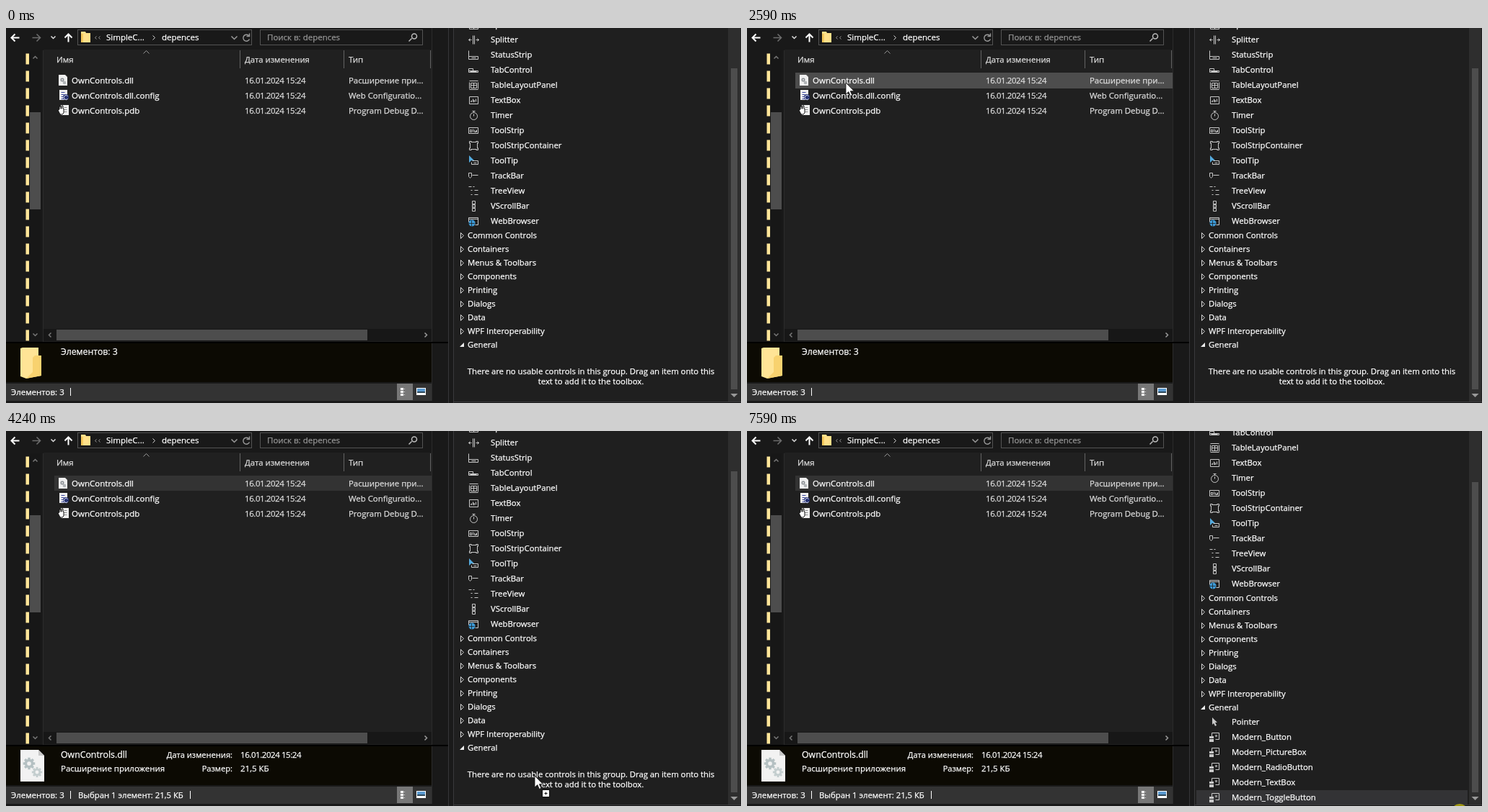
Animation, 1019 px wide and 521 px high, one loop 7660 ms. Source, as an HTML page with a canvas:

```html
<!DOCTYPE html>
<html lang="ru">
<head>
<meta charset="utf-8">
<title>Toolbox drag and drop</title>
<style>
html, body { margin: 0; width: 100%; height: 100%; overflow: hidden; background: #191919; }
canvas { display: block; }
</style>
</head>
<body>
<canvas id="stage" width="1019" height="521"></canvas>
<script>
const g = document.getElementById('stage').getContext('2d');
const LOOP = 7660, STEP = 70;
const PRESS = 2660, DETAILS = 2730, BLUR = 3420, DROP = 4240, ADDED = 4640, SCROLL = 5560, LEAVE = 6800, CLICK = 7590;

// The pointer advances in steps of 70 ms, counted from these moments.
const starts = [0, 390, 1500, 1700, 2590, 3350, DROP, ADDED, 5230, 5300, SCROLL, 5690, 6240, CLICK];
const track = [
  [390, 804, 512], [600, 650, 425], [810, 380, 270], [950, 220, 172], [1090, 142, 133], [1160, 142, 123],
  [1300, 140, 106], [1499, 140, 106], [1500, 139, 104], [1699, 139, 104], [1700, 139, 107], [1840, 140, 114],
  [2050, 139, 100], [2260, 138, 85], [2460, 137, 77], [2590, 137, 76], [2800, 142, 80], [2940, 230, 136],
  [3150, 530, 315], [3350, 714, 419], [3630, 728, 465], [3840, 733, 479], [5229, 733, 479], [5230, 735, 479],
  [5300, 736, 478], [5689, 736, 478], [6239, 736, 478], [6240, 741, 478], [6450, 790, 491], [6660, 920, 511],
  [LEAVE, 988, 540]
];

const tools = [
  ['SplitContainer', 'M-6-6H6V6H-6ZM0-6V6'],
  ['Splitter', 'M-1-6V6M1-6V6M-7 0H-3M3 0H7M-5-2L-7 0L-5 2M5-2L7 0L5 2'],
  ['StatusStrip', 'M-7-6V6H6V2H-7M-3 4H3'],
  ['TabControl', 'M-7-2H-1V1H6V3H-7ZM-7 1H0M-5 2H4'],
  ['TableLayoutPanel', 'M-6-6H6M-6 6H6M-6-4V5M6-4V5M-4-3H4V4H-4ZM-4 0H4M0-3V4'],
  ['TextBox', 'M-6-5H6V5H-6ZM-3 0V2H-4V1M-1-2V2H1V0H-1M3-2V2'],
  ['Timer', 'M5 1A5 5 0 1 1-5 1A5 5 0 1 1 5 1M0 1V-2M-2-6H2M0-6V-4'],
  ['ToolStrip', 'M-7-4H6V4H-7ZM-5-1V2H-3V-1ZM-1-2V2M1-1V2H4V-1M3 0V2'],
  ['ToolStripContainer', 'M-6-3V-6H-3M3-6H6V-3M6 3V6H3M-3 6H-6V3M-5-4V4M5-4V4M-4-5H4M-4 5H4'],
  ['ToolTip', 'M-2 0H6V5H-3V2M0 3H4'],
  ['TrackBar', 'M-7-4H-3V1L-5 3L-7 1ZM-2-1H6'],
  ['TreeView', 'M-7-6H-3M-1-6H1M-4-1H-2M1-1H6M-4 5H-2M1 5H6'],
  ['VScrollBar', 'M-2-7H2V-3H-2ZM-2-2H2V2H-2ZM-2 3H2V7H-2ZM0-5V-5M0 5V5M-1 0H1'],
  ['WebBrowser', 'M-7 1V-5H6V5H2M-7-3H6']
].map(([name, d]) => [name, new Path2D(d)]);
const groups = ['Common Controls', 'Containers', 'Menus & Toolbars', 'Components', 'Printing', 'Dialogs', 'Data',
  'WPF Interoperability', 'General'];
const added = ['Pointer', 'Modern_Button', 'Modern_PictureBox', 'Modern_RadioButton', 'Modern_TextBox', 'Modern_ToggleButton'];
const files = [
  ['OwnControls.dll', 'Расширение при...'],
  ['OwnControls.dll.config', 'Web Configuratio...'],
  ['OwnControls.pdb', 'Program Debug D...']
];
const DATE = '16.01.2024 15:24';
const ARROW = new Path2D('M0 0V16L3.8 12.6L6.4 18.4L8.8 17.4L6.3 11.7H11.4Z');

function rect(x, y, w, h, color) {
  g.fillStyle = color;
  g.fillRect(x, y, w, h);
}
function frame(x, y, w, h, color) {
  g.strokeStyle = color;
  g.lineWidth = 1;
  g.strokeRect(x + .5, y + .5, w - 1, h - 1);
}
// A hairline stroke gives the small glyphs full brightness.
function text(s, x, y, color = '#fff', align = 'left', size = 11.5, gap = 0) {
  g.font = size + 'px "Open Sans", "Noto Sans", sans-serif';
  g.letterSpacing = gap + 'px';
  g.textAlign = align;
  g.fillStyle = g.strokeStyle = color;
  g.lineWidth = .25;
  g.fillText(s, x, y + 4);
  g.strokeText(s, x, y + 4);
}
const date = (x, y, color) => text(DATE, x, y, color, 'left', 11.4, -.38);
const label = (s, x, y, align) => text(s, x, y, '#fff', align, 11.3);
const heading = (s, x, y) => text(s, x, y, '#fff', 'left', 12.3);

function path(d, x, y, { fill, stroke, width = 1 }) {
  const p = typeof d === 'string' ? new Path2D(d) : d;
  g.save();
  g.translate(x, y);
  if (fill) { g.fillStyle = fill; g.fill(p); }
  if (stroke) { g.strokeStyle = stroke; g.lineWidth = width; g.stroke(p); }
  g.restore();
}
const line = (d, x, y, stroke, width) => path(d, x + .5, y + .5, { stroke, width });
function disc(x, y, r, color) {
  g.fillStyle = color;
  g.beginPath();
  g.arc(x, y, r, 0, 7);
  g.fill();
}
function gear(x, y, r, color) {
  g.strokeStyle = color;
  g.lineWidth = r * .45;
  g.beginPath();
  g.arc(x, y, r * .6, 0, 7);
  g.stroke();
  for (let i = 0; i < 8; i++) {
    const a = i * Math.PI / 4, c = Math.cos(a), s = Math.sin(a);
    g.beginPath();
    g.moveTo(x + c * r * .7, y + s * r * .7);
    g.lineTo(x + c * r * 1.1, y + s * r * 1.1);
    g.stroke();
  }
}

function pointerAt(t) {
  const base = starts.filter(s => s <= t).pop();
  const q = base + Math.floor((t - base) / STEP) * STEP;
  const i = track.findIndex(k => k[0] >= q);
  if (i < 0) return track[track.length - 1].slice(1);
  if (i === 0) return track[0].slice(1);
  const [t0, x0, y0] = track[i - 1], [t1, x1, y1] = track[i], f = (q - t0) / (t1 - t0);
  return [Math.round(x0 + (x1 - x0) * f), Math.round(y0 + (y1 - y0) * f)];
}

function addressBar() {
  line('M-5 0H6M0-5L-5 0L0 5', 12, 13, '#fff', 2);
  line('M-6 0H5M0-5L5 0L0 5', 42, 13, '#6d6d6d', 1.6);
  line('M-3-1L0 2L3-1', 65, 12, '#ddd', 1.5);
  line('M0 6V-5M-5 0L0-5L5 0', 86, 13, '#fff', 2);
  frame(99, 2, 242, 22, '#535353');
  path('M0 0H6L7 2H13V15H0Z', 104, 5, { fill: '#ffe08a' });
  rect(104, 8, 3, 12, '#f5c95c');
  line('M-1-2L-3 0L-1 2M4-2L2 0L4 2', 126, 13, '#999');
  text('SimpleC...', 139, 13);
  line('M-1-3L2 0L-1 3', 204, 13, '#ddd');
  text('depences', 216, 13);
  line('M-4-2L0 2L4-2', 316, 13, '#999', 1.5);
  line('M3-3A4.5 4.5 0 1 0 4 2M4-6V-2H0', 333, 13, '#999', 1.4);
  frame(352, 2, 226, 22, '#535353');
  text('Поиск в: depences', 362, 13, '#969696');
  line('M-1 1L-5 5M6-2A3.5 3.5 0 1 1-1-2A3.5 3.5 0 1 1 6-2', 563, 13, '#bbb', 1.5);
}

function navPane() {
  rect(33, 31, 15, 405, '#171717');
  rect(33, 117, 15, 135, '#4d4d4d');
  for (let i = 0; i < 17; i++) rect(27.5, 35.5 + i * 24, 4.5, 15, '#ffe699');
  line('M-3 2L0-1L3 2', 40, 40, '#777', 1.5);
  line('M-3-2L0 1L3-2', 40, 426, '#777', 1.5);
  rect(51, 31, 1, 405, '#2b2b2b');
}

function fileIcon(i, y) {
  if (i === 0) {
    path('M0 0H9L12 3V15H0Z', 73, y - 8, { fill: '#f0f0f0' });
    gear(78, y - 1, 2.6, '#8a8f94');
    gear(81, y + 3, 2, '#8a8f94');
  } else if (i === 1) {
    rect(74, y - 8, 11, 14, '#f0f0f0');
    line('M0 0H5M0 3H4M0 6H4M0 9H5', 76, y - 5, '#3a46a0');
    disc(83, y + 2, 4, '#263272');
    line('M2-2A3 3 0 1 0 2 2', 83, y + 2, '#e8ecff');
  } else {
    rect(76, y - 8, 11, 14, '#f0f0f0');
    line('M0 0H4M0 3H4M0 6H4', 80, y - 5, '#888');
    path('M0 5L2 4V0H4V3H5V-1H7V3H8V9L6 11H3Z', 72, y - 6, { fill: '#fff', stroke: '#111' });
  }
}

function fileList(t, y) {
  rect(52, 30, 538, 406, '#202020');
  text('Имя', 70, 44, '#dedede');
  text('Дата изменения', 331, 44, '#dedede', 'left', 11.3);
  text('Тип', 475, 44, '#dedede');
  for (const x of [324, 468, 588]) rect(x, 31, 1, 25, '#636363');
  line('M-4 2L0-2L4 2', 194, 33, '#999');

  const hover = t >= 390 && t < PRESS ? Math.floor((y - 62) / 21) : -1;
  files.forEach(([name, type], i) => {
    const cy = 73 + i * 21;
    if (i === 0 && t >= PRESS) {
      rect(67, 62, 523, 21, t < BLUR ? '#777' : '#333');
      if (t < BLUR) frame(67, 62, 524, 21, '#8c8c8c');
    } else if (i === hover) rect(67, cy - 11, 523, 22, '#4d4d4d');
    fileIcon(i, cy);
    text(name, 91, cy);
    date(331, cy, '#dedede');
    text(type, 475, cy, '#dedede', 'left', 11.4);
  });

  rect(52, 418, 538, 17, '#171717');
  rect(70, 419, 431, 15, '#4d4d4d');
  line('M2-3L-1 0L2 3', 60, 426, '#777', 1.5);
  line('M-2-3L1 0L-2 3', 582, 426, '#999', 1.5);
}

function details(t) {
  rect(0, 436, 590, 2, '#000');
  rect(0, 438, 590, 54, '#0c0a03');
  rect(0, 494, 590, 24, '#333');
  text('Элементов: 3', 7, 506);
  rect(89, 500, 1, 11, '#fff');
  if (t < DETAILS) {
    path('M0 1L3 0H25V11L29 12V39L8 43L0 40Z', 20, 444, { fill: '#ffe496' });
    path('M17 14L20 11H29V39L8 43L17 34Z', 20, 444, { fill: '#f8d26f' });
    heading('Элементов: 3', 76, 450);
  } else {
    path('M0 0H25L33 8V44H0Z', 20, 443, { fill: '#f2f2f2' });
    path('M25 0V8H33Z', 20, 443, { fill: '#c8c8c8' });
    gear(32, 462, 7.5, '#b4c0c2');
    gear(43, 474, 6.5, '#c4cecf');
    heading('OwnControls.dll', 76, 450);
    text('Расширение приложения', 76, 469);
    text('Дата изменения:', 314, 450, '#fff', 'right', 11.1);
    date(325, 450, '#fff');
    text('Размер:', 314, 469, '#fff', 'right', 11.1);
    text('21,5 КБ', 325, 469);
    text('Выбран 1 элемент: 21,5 КБ', 100, 506, '#fff', 'left', 11.3);
    rect(255, 500, 1, 11, '#fff');
  }
  rect(542, 494, 22, 23, '#777');
  for (let i = 0; i < 3; i++) {
    rect(547, 500 + i * 4, 4, 3, '#fff');
    rect(552, 501 + i * 4, 1, 1, '#ddd');
  }
  rect(569, 500, 13, 10, '#fff');
  rect(570, 501, 11, 6, '#5a9ad0');
  rect(570, 505, 11, 2, '#2f4a5c');
}

function toolbox(t, x, y) {
  rect(590, 0, 23, 521, '#191919');
  rect(590, 0, 1, 518, '#2b2b2b');
  rect(590, 436, 23, 2, '#000');
  rect(613, 0, 8, 521, '#1a1a1a');
  rect(613, 0, 1, 521, '#363638');
  rect(620, 0, 399, 520, '#1f1f1f');
  rect(620, 0, 1, 521, '#3a3a3c');
  rect(620, 519, 399, 1, '#3a3a3c');

  g.save();
  g.beginPath();
  g.rect(621, 0, 380, 519);
  g.clip();
  const filled = t >= ADDED;
  g.translate(0, t >= SCROLL ? -56 : 0);
  tools.forEach(([name, icon], i) => {
    const cy = i * 21 - 5;
    line(icon, 648, cy, '#c8c8c8');
    if (name === 'ToolTip') path('M-6-7V3L-3 0H1Z', 648, cy, { fill: '#55aadd' });
    if (name === 'WebBrowser') {
      disc(646, cy + 3, 4.5, '#3d9bd8');
      line('M-4 0H4M0-4V4', 645, cy + 3, '#1f1f1f', .8);
    }
    label(name, 672, cy);
  });
  groups.forEach((name, i) => {
    const cy = 288 + i * 19;
    if (name === 'General') path('M6-3V3H0Z', 629, cy, { fill: '#f0f0f0' });
    else line('M0-4V4L4 0Z', 630, cy, '#d8d8d8');
    label(name, 640, cy);
  });
  if (filled) {
    const inside = t < LEAVE && x < 999 && y < 519;
    const hover = inside ? Math.round((y + (t < 5690 ? 0 : 56) - 460) / 21) : -1;
    added.forEach((name, i) => {
      const cy = 460 + i * 21;
      if (i === hover) rect(623, cy - 10, 376, 20, '#3e3e40');
      else if (i === 5) rect(623, cy - 10, 376, 20, '#333335');
      if (i === 0) path('M-3-6V4L-1 2L1 6L3 5L1 1H4Z', 648, cy, { fill: '#c8c8c8' });
      else {
        line('M-4-1V-6H6V3H1', 648, cy, '#c8c8c8');
        rect(641, cy - 1, 6, 3, '#c8c8c8');
        rect(641, cy + 3, 6, 4, '#c8c8c8');
        rect(649, cy - 3, 3, 3, '#888');
      }
      label(name, 672, cy);
    });
  } else {
    label('There are no usable controls in this group. Drag an item onto this', 811, 477, 'center');
    label('text to add it to the toolbox.', 811, 491, 'center');
  }
  g.restore();

  rect(1001, 0, 17, 519, '#2e2e2e');
  const [top, height] = !filled ? [56, 446] : t < SCROLL ? [44, 431] : [71, 431];
  rect(1005, top, 9, height, '#4d4d4d');
  path('M-5-2H5L0 3Z', 1009.5, 510, { fill: '#999' });
}

function pointer(t, x, y) {
  const halo = 'rgba(225, 210, 0, .65)';
  if (t >= PRESS && t < DROP) disc(x - 1, y + 1, 12, halo);
  if (t >= CLICK) disc(988, 530, 12, halo);
  if (t < 390 || t >= LEAVE) return;
  path(ARROW, x, y, { fill: '#fff', stroke: '#111', width: .8 });
  if (t >= 3560 && t < 4310) {
    rect(x + 10, y + 19, 11, 11, '#fff');
    frame(x + 10, y + 19, 11, 11, '#111');
    line('M-2 0H2M0-2V2', x + 15, y + 24, '#111');
  }
}

function draw(now) {
  const t = now % LOOP, [x, y] = pointerAt(t);
  rect(0, 0, 1019, 521, '#191919');
  addressBar();
  navPane();
  fileList(t, y);
  details(t);
  toolbox(t, x, y);
  pointer(t, x, y);
  requestAnimationFrame(draw);
}
requestAnimationFrame(draw);
</script>
</body>
</html>
```
